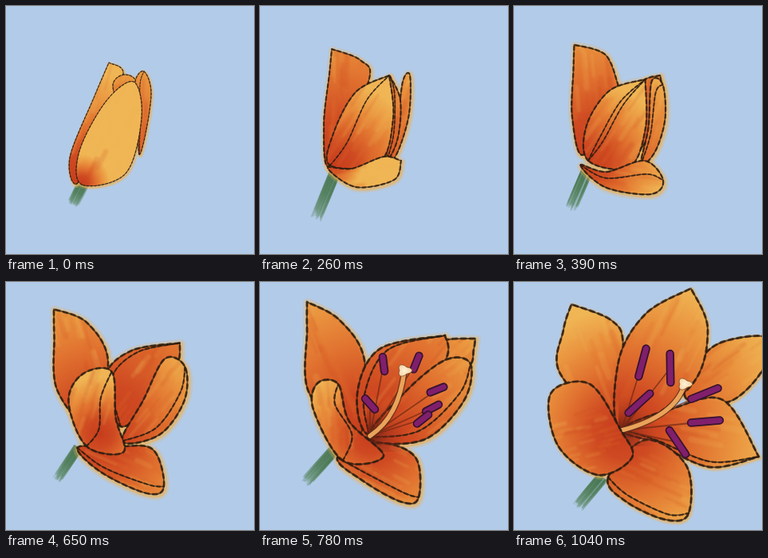
Recreate the animation shown at these times as an HTML page with a canvas. Size 311x311 px, loop 1.17 s.

```html
<!DOCTYPE html>
<html lang="en">
<head>
<meta charset="utf-8">
<title>Opening flower</title>
<style>
html, body { margin: 0; width: 100%; height: 100%; overflow: hidden; background: #b2cbe9; }
canvas { display: block; width: 311px; height: 311px; }
</style>
</head>
<body>
<canvas id="stage" width="311" height="311"></canvas>
<script>
const SIZE = 311, STEP = 130, LOOP = 1170;
const ctx = document.getElementById('stage').getContext('2d');
const SKY = '#b2cbe9', INK = '#2b1c10', GOLD = '#edb150';
const TONES = ['#c63c1c', '#cf4a22', '#e0702f', '#ea953f', '#f0b655'];

// Petal: how far the red spreads from the heart, then six key points
// (base, two on one side, tip, two back down the other side; "c" = corner),
// then optional inner lines as a position between the two sides.
const bud = {
  ink: 1.2, halo: 3, heart: [95, 222], stem: [97, 222, 84, 248],
  petals: {
    left: [.9, '90,222 80,190 111,113 129,71c 147,86 118,145'],
    top: [1.2, '140,112 134,100 139,90 150,86 161,91 166,106'],
    right: [1.3, '167,186 165,135 162,95 173,82 182,107 176,155', .3],
    front: [.25, '95,224 92,182 125,120 160,95 170,140 150,210']
  }
};
const loose = {
  ink: 2, halo: 5, heart: [95, 200], stem: [94, 208, 71, 264],
  petals: {
    left: [1.5, '88,200 80,150 87,85 90,54c 126,68 136,95'],
    right: [1.2, '163,194 172,150 179,95 188,87 187,135 174,180'],
    top: [1.5, '160,191 160,150 158,100 163,88c 176,118 173,165', .6],
    front: [.8, '88,200 92,160 120,108 162,87c 167,140 150,196', .3],
    low: [.4, '85,203 115,204 155,189 177,194c 168,218 120,227']
  }
};
const parting = {
  ink: 2.3, halo: 6, heart: [98, 188], stem: [90, 205, 73, 243],
  petals: {
    left: [1.3, '88,172 66,130 62,75 61,43c 103,54 125,102c'],
    top: [1.9, '150,170 128,98 165,88 204,86c 195,115 175,135'],
    right: [1, '155,204 165,155 166,95 185,110 192,148 180,185', .3],
    front: [.8, '98,188 90,140 120,104 167,97c 163,165 140,208', .3, .38],
    low: [1.6, '82,196 117,212 172,199 197,243 175,254 110,228', .4]
  }
};
const cup = {
  ink: 2.7, halo: 6, heart: [138, 193], stem: [92, 212, 58, 250],
  head: [181, 111], age: 0,
  petals: {
    left: [1.2, '125,190 62,140 59,60 59,25c 100,48 131,98'],
    back: [1.2, '225,115 232,90 233,73 270,71c 268,85 262,105'],
    top: [1.6, '137,192 122,140 150,84 232,67c 234,95 195,160', .12],
    right: [1.3, '137,195 180,140 232,98 264,103 255,150 205,198', .8],
    low: [1.5, '97,220 150,202 195,220 199,270 178,276 130,250', .8],
    front: [1, '104,224 67,160 72,127 98,128 112,175 155,218', .55]
  }
};
const open = {
  ink: 2.7, halo: 4, heart: [142, 192], stem: [101, 240, 68, 276],
  head: [184, 112], age: .5,
  petals: {
    left: [1.1, '125,190 66,150 60,75 64,26c 112,52 133,105'],
    back: [1.1, '225,150 238,115 248,86 297,90c 288,115 255,137'],
    top: [1.3, '140,190 130,125 165,76 239,61c 244,95 215,150'],
    right: [1.1, '140,192 180,148 250,136 296,169c 262,203 195,215', .85],
    low: [1.1, '115,240 165,200 210,238 211,272 188,282c 150,262', .85],
    front: [1.2, '115,240 66,185 68,126 90,130 108,178 152,212', .5]
  }
};
const bloom = {
  ink: 2.7, halo: 4, heart: [135, 186], stem: [111, 245, 81, 281],
  head: [214, 128], age: 1,
  petals: {
    left: [.9, '130,182 58,115 62,60 72,28c 122,48 137,80'],
    back: [1, '215,145 232,100 262,75 318,70 312,110 270,150'],
    top: [1, '135,185 131,100 165,40 222,8c 243,60 222,130'],
    right: [1.1, '135,185 195,160 262,148 307,219c 245,232 178,202', .92],
    low: [1.2, '118,245 165,198 216,230 219,290 190,298 140,275', .9],
    front: [1.4, '134,186 95,128 46,140 55,205 105,242 148,220']
  }
};

// Anthers drift from the first to the second place: x, y, angle in degrees.
const ANTHERS = [
  [[155, 103, 83], [161, 101, 105]],
  [[196, 101, 112], [196, 108, 89]],
  [[138, 153, 48], [157, 152, -42]],
  [[222, 135, -22], [239, 140, -22]],
  [[216, 158, -28], [240, 175, -5]],
  [[204, 172, -38], [205, 201, 56]]
];

const lerp = (a, b, k) => a + (b - a) * k;
const mixAll = (a, b, k) => b.map((v, i) => lerp(a[i], v, k));
const mixPoint = (p, q, k) => ({ x: lerp(p.x, q.x, k), y: lerp(p.y, q.y, k), c: q.c });
const point = ([x, y]) => ({ x, y });
const parse = s => s.split(' ').map(t => ({ ...point(t.split(',').map(parseFloat)), c: t.endsWith('c') }));

function prepare(pose) {
  const petals = {};
  for (const name in pose.petals) {
    const [warm, outline, ...rims] = pose.petals[name];
    petals[name] = { warm, pts: parse(outline), rims };
  }
  return { ...pose, petals };
}

// Halfway pose built from the petals both neighbours share.
function between(a, b) {
  const petals = {};
  for (const name in b.petals) {
    const p = a.petals[name], q = b.petals[name];
    if (p) petals[name] = {
      warm: lerp(p.warm, q.warm, .5), rims: q.rims,
      pts: q.pts.map((v, i) => mixPoint(p.pts[i], v, .5))
    };
  }
  return {
    ink: lerp(a.ink, b.ink, .5), halo: lerp(a.halo, b.halo, .5),
    heart: mixAll(a.heart, b.heart, .5), stem: mixAll(a.stem, b.stem, .5), petals
  };
}

// Smooth curve through the points, broken at corners.
function spline(pts, closed) {
  const n = pts.length, path = new Path2D();
  const at = i => closed ? pts[(i + n) % n] : pts[Math.max(0, Math.min(n - 1, i))];
  path.moveTo(pts[0].x, pts[0].y);
  for (let i = 0; i < (closed ? n : n - 1); i++) {
    const p = at(i), q = at(i + 1);
    const a = p.c ? p : at(i - 1), b = q.c ? q : at(i + 2);
    path.bezierCurveTo(p.x + (q.x - a.x) / 6, p.y + (q.y - a.y) / 6,
      q.x - (b.x - p.x) / 6, q.y - (b.y - p.y) / 6, q.x, q.y);
  }
  if (closed) path.closePath();
  return path;
}

function line(a, b, bend = point([(a.x + b.x) / 2, (a.y + b.y) / 2])) {
  const path = new Path2D();
  path.moveTo(a.x, a.y);
  path.quadraticCurveTo(bend.x, bend.y, b.x, b.y);
  return path;
}

function random(seed) {
  return () => {
    seed = (seed * 16807 + 11) % 2147483647;
    return seed / 2147483647;
  };
}

function stroke(path, color, width, alpha = 1) {
  ctx.globalAlpha = alpha;
  ctx.strokeStyle = color;
  ctx.lineWidth = width;
  ctx.stroke(path);
  ctx.globalAlpha = 1;
}

// Charcoal line: a thin core under broken heavier dashes.
function inkLine(path, width) {
  stroke(path, INK, width * .7, .7);
  ctx.setLineDash([width * 2, width * 2]);
  stroke(path, INK, width * 1.1, .75);
  ctx.setLineDash([]);
}

function radial({ x, y }, r, colors) {
  const g = ctx.createRadialGradient(x, y, 0, x, y, r);
  colors.forEach((c, i) => g.addColorStop(i / (colors.length - 1), c));
  return g;
}

function drawStem([x, y, x2, y2], rnd) {
  const fade = ctx.createLinearGradient(x, y, x2, y2);
  ['#47744f', '#527f5c', '#6c957d88'].forEach((c, i) => fade.addColorStop(i / 2, c));
  const len = Math.hypot(x2 - x, y2 - y), nx = (y - y2) / len, ny = (x2 - x) / len;
  for (let i = 0; i < 40; i++) {
    const o = (rnd() - .5) * 14, end = .85 + rnd() * .2;
    const a = point([x + nx * o, y + ny * o]);
    stroke(line(a, point([a.x + (x2 - x) * end, a.y + (y2 - y) * end])), fade, 1.8, .5);
  }
}

function drawPetal({ warm, pts, rims }, pose, rnd) {
  const heart = point(pose.heart), base = pts[0], tip = pts[3];
  const reach = Math.max(...pts.map(p => Math.hypot(p.x - heart.x, p.y - heart.y)));
  const outline = spline(pts, true);
  ctx.fillStyle = radial(heart, reach * warm, TONES);
  ctx.fill(outline);

  // Soft brush marks running from base to tip.
  const dx = tip.x - base.x, dy = tip.y - base.y, len = Math.hypot(dx, dy);
  ctx.save();
  ctx.clip(outline);
  ctx.filter = 'blur(1.2px)';
  for (let i = 0; i < 45; i++) {
    const t = rnd(), span = .15 + rnd() * .2;
    const spread = (rnd() - .5) * (.25 + .7 * Math.sin(t * Math.PI));
    const a = point([base.x + dx * t - dy * spread, base.y + dy * t + dx * spread]);
    const b = point([a.x + dx * span, a.y + dy * span]);
    const tone = TONES[rnd() < t / warm ? 4 : 2 - Math.round(rnd())];
    stroke(line(a, b), tone, 2 + rnd() * len * .04, .2);
  }
  ctx.restore();

  inkLine(outline, pose.ink);
  for (const k of rims) {
    const side = [mixPoint(pts[1], pts[5], k), mixPoint(pts[2], pts[4], k)];
    inkLine(spline([base, ...side, tip]), pose.ink * .8);
  }
}

function drawStamens({ heart, head, age }) {
  const root = point(heart), top = point(head);
  ctx.fillStyle = radial(root, 45, ['#5a1c12dd', '#8a281766', '#a0301800']);
  ctx.fillRect(root.x - 4, root.y - 45, 49, 65);

  const half = lerp(9, 18, age);
  const pods = ANTHERS.map(([from, to]) => {
    const [x, y, deg] = mixAll(from, to, age), a = deg * Math.PI / 180;
    const ux = Math.cos(a) * half, uy = Math.sin(a) * half;
    stroke(line(root, point([x, y])), '#702915', 1.8, .7);
    return line(point([x - ux, y - uy]), point([x + ux, y + uy]));
  });
  const style = line(root, top, point([lerp(root.x, top.x, .85), lerp(root.y, top.y, .3)]));
  stroke(style, '#5b2b17', 8, .8);
  stroke(style, '#e9a35a', 5.5);
  for (const pod of pods) {
    stroke(pod, '#37122f', 10.5);
    stroke(pod, '#801f6c', 7);
  }

  const knob = Array.from({ length: 12 }, (_, i) => {
    const a = i * Math.PI / 6, r = 8 + 2 * Math.cos(a * 3);
    return point([top.x + Math.cos(a) * r, top.y + Math.sin(a) * r * .8]);
  });
  const blob = spline(knob, true);
  ctx.fillStyle = radial(top, 10, ['#fff1d8', '#f3cf96']);
  ctx.fill(blob);
  stroke(blob, '#6b3a1c', 1, .7);
}

function draw(pose, seed) {
  const rnd = random(seed * 7919 + 101), petals = Object.entries(pose.petals);
  ctx.fillStyle = SKY;
  ctx.fillRect(0, 0, SIZE, SIZE);
  ctx.lineCap = ctx.lineJoin = 'round';
  drawStem(pose.stem, rnd);

  // Colour spilling past the lines, a little low and to the right.
  ctx.save();
  ctx.translate(1, 1.5);
  for (const [, { pts }] of petals) {
    const edge = spline(pts, true);
    stroke(edge, GOLD, pose.halo * 2, .25);
    stroke(edge, GOLD, pose.halo, .6);
  }
  ctx.restore();

  if (pose.head) {
    ctx.fillStyle = TONES[1];
    ctx.beginPath();
    ctx.arc(...pose.heart, 26, 0, Math.PI * 2);
    ctx.fill();
  }
  for (const [name, petal] of petals) {
    if (name === 'front' && pose.head) drawStamens(pose);
    drawPetal(petal, pose, rnd);
  }
}

const [p0, p1, p2, p3, p4, p5] = [bud, loose, parting, cup, open, bloom].map(prepare);
const poses = [p0, between(p0, p1), p1, between(p1, p2), p2, between(p2, p3), p3, p4, p5];
const start = performance.now();
let shown = -1;

function tick() {
  const step = Math.floor((performance.now() - start) % LOOP / STEP);
  if (step !== shown) draw(poses[shown = step], step);
  requestAnimationFrame(tick);
}
tick();
</script>
</body>
</html>
```
